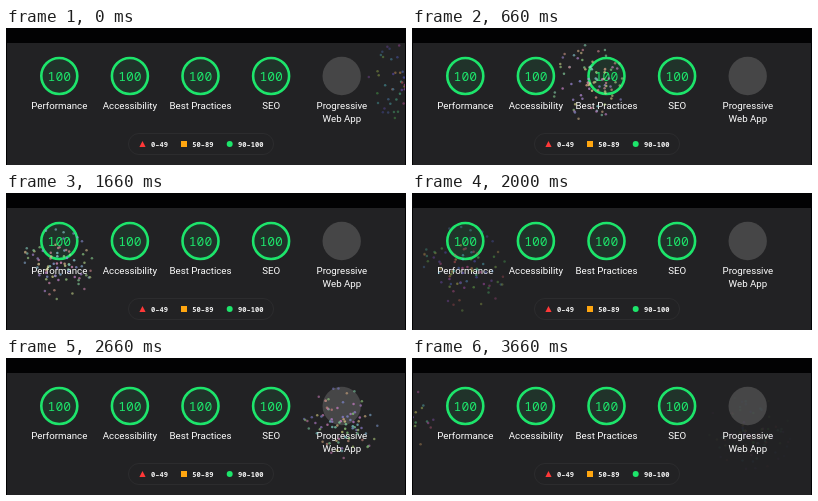
Write an HTML page that moves like this. It is 400 px wide and 137 px high and loops after 4 s.

```html
<!DOCTYPE html>
<html lang="en">
<head>
<meta charset="utf-8">
<title>Audit scores</title>
<style>
html, body { margin: 0; width: 100%; height: 100%; overflow: hidden; background: #020203; }
svg { display: block; width: 100%; height: 100%; }
text { text-anchor: middle; }
.label { font: 9.7px Roboto, sans-serif; fill: #fff; }
.score { font: 500 13px "Noto Sans Mono", monospace; fill: #1de56b; }
.range { font: 700 7.1px "Noto Sans Mono", monospace; fill: #f2f2f2; text-anchor: start; }
</style>
</head>
<body>
<svg id="stage" viewBox="0 0 400 137">
  <defs><clipPath id="panel"><rect x="1" y="15" width="398" height="122"/></clipPath></defs>
  <rect width="400" height="137" fill="#020203"/>
  <rect x="1" y="15" width="398" height="122" fill="#222224"/>
  <g id="gauges"></g>
  <circle cx="335.7" cy="48" r="19.2" fill="#464647"/>
  <text class="label" x="335.9" y="81.4">Progressive</text>
  <text class="label" x="335.9" y="93.8">Web App</text>
  <rect x="122.5" y="105.5" width="145" height="21" rx="10.5" fill="none" stroke="#2c2c2e"/>
  <path d="M136.5 113l3.1 6h-6.2z" fill="#ff3838"/>
  <rect x="175" y="113" width="6" height="6" fill="#ffa610"/>
  <circle cx="223.7" cy="116" r="3" fill="#1de56b"/>
  <text class="range" x="145" y="118.6">0–49</text>
  <text class="range" x="186.3" y="118.6">50–89</text>
  <text class="range" x="232" y="118.6">90–100</text>
  <g id="sparks" clip-path="url(#panel)"></g>
</svg>
<script>
const LOOP = 4000, COUNT = 85;
const byId = id => document.getElementById(id);

function add(parent, tag, attrs, text) {
  const el = document.createElementNS("http://www.w3.org/2000/svg", tag);
  for (const k in attrs) el.setAttribute(k, attrs[k]);
  if (text) el.textContent = text;
  parent.appendChild(el);
  return el;
}

["Performance", "Accessibility", "Best Practices", "SEO"].forEach((name, i) => {
  const g = byId("gauges"), x = 53.3 + i * 70.6;
  add(g, "circle", { cx: x, cy: 48, r: 18, fill: "#20332a", stroke: "#1de56b", "stroke-width": 2.6 });
  add(g, "text", { class: "score", x, y: 52.7 }, "100");
  add(g, "text", { class: "label", x, y: 81.4 }, name);
});

let seed = 41;
const rand = () => (seed = (seed * 16807) % 2147483647) / 2147483647;

// x, y, birth, life, half width, half height
const bursts = [
  [175, 53, 245, 1000, 48, 48],
  [53, 68, 1080, 1400, 46, 46],
  [337, 62, 2100, 1250, 47, 43],
  [337, 61, 2820, 880, 43, 41],
  [-17, 57, 3200, 790, 43, 38],
  [402, 47, 3700, 480, 42, 44]
].map(([x, y, birth, life, w, h]) => {
  const group = add(byId("sparks"), "g", {});
  const dots = Array.from({ length: COUNT }, () => {
    const angle = rand() * Math.PI * 2, reach = rand() ** 0.75;
    return {
      dx: Math.cos(angle) * reach * w,
      dy: Math.sin(angle) * reach * h,
      reach,
      hue: Math.floor(rand() * 360),
      el: add(group, "circle", { r: 1.25 })
    };
  });
  const core = add(group, "circle", { cx: x, cy: y + 5, r: 2.4, fill: "#fff" });
  return { x, y, birth, life, group, dots, core };
});

function drawBurst(b, time) {
  const u = ((time - b.birth + LOOP) % LOOP) / b.life;
  b.group.setAttribute("display", u < 1 ? "inline" : "none");
  if (u >= 1) return;
  const spread = 1 - (1 - u) ** 3;
  const fall = 18 * u ** 2.5;
  const light = 100 - 43 * Math.min(1, u * 1.6);
  b.group.setAttribute("opacity", 0.9 * (1 - u ** 2.2));
  b.core.setAttribute("opacity", Math.max(0, 1 - 2.4 * u));
  for (const d of b.dots) {
    d.el.setAttribute("cx", b.x + d.dx * spread);
    d.el.setAttribute("cy", b.y + d.dy * spread + fall);
    d.el.setAttribute("fill", `hsl(${d.hue},55%,${light}%)`);
    d.el.setAttribute("opacity", 1 - 0.75 * u * d.reach);
  }
}

// The picture holds for a third of a second at a time.
function hold(t) {
  const r = t % 1000;
  return t - r + (r >= 660 ? 660 : r >= 330 ? 330 : 0);
}

let start = null, shown = -1;
function tick(now) {
  if (start === null) start = now;
  const time = hold((now - start) % LOOP);
  if (time !== shown) {
    shown = time;
    bursts.forEach(b => drawBurst(b, time));
  }
  requestAnimationFrame(tick);
}
requestAnimationFrame(tick);
</script>
</body>
</html>
```
